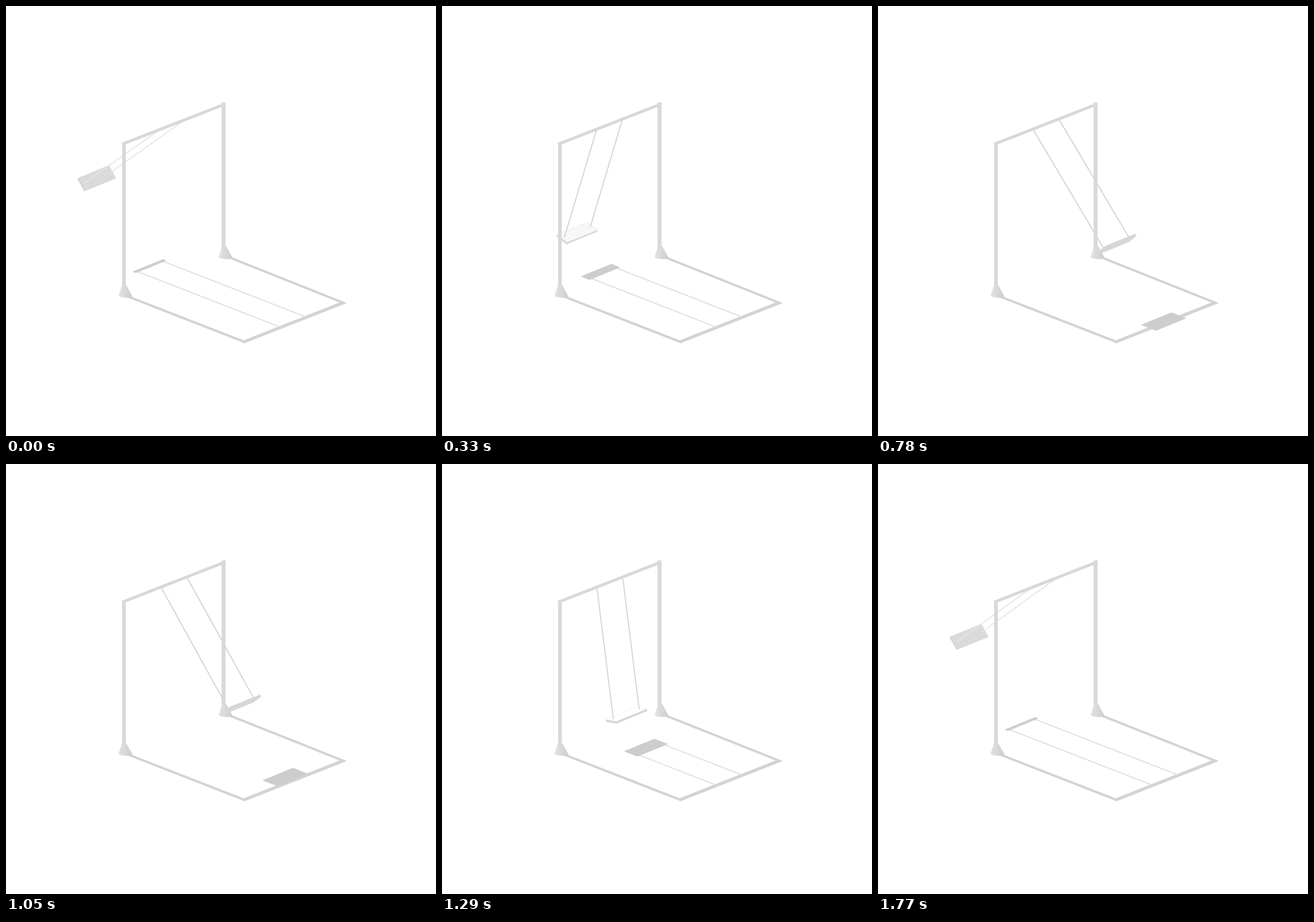
Recreate the animation shown at these times as an HTML page with a canvas. Size 700 px wide and 700 px high, loop 1.8 s.

```html
<!DOCTYPE html>
<html>
<head>
<meta charset="utf-8">
<style>
html, body { margin: 0; width: 100%; height: 100%; overflow: hidden; background: #fff; }
canvas { display: block; width: 700px; height: 700px; }
</style>
</head>
<body>
<canvas id="c" width="700" height="700"></canvas>
<script>
const ctx = document.getElementById('c').getContext('2d');
const LOOP = 1800, STEP = 30;
const REACH = 167, DROP = 210;        // rope length projected forward and down
const SLOPE = 0.39;                   // screen slope of the floor's forward axis
const HEIGHT = 247, CAST = 195;       // beam height and length of its shadow
const LEFT = [252, 200], RIGHT = [294, 183.5];
const END = [3.75, -1.8];             // seat overhang beyond each rope
const HALF = 0.051;                   // seat half width per rope length
const TOP = 0.99, BOTTOM = 1.006;     // seat faces, measured along the rope

const grey = v => `rgb(${v},${v},${v})`;
const add = (p, q, k = 1) => [p[0] + q[0] * k, p[1] + q[1] * k];

function path(points) {
  ctx.beginPath();
  points.forEach(p => ctx.lineTo(...p));
}
function fill(points, color) {
  path(points);
  ctx.closePath();
  ctx.fillStyle = color;
  ctx.fill();
}
function line(points, width, color) {
  path(points);
  ctx.lineWidth = width;
  ctx.strokeStyle = color;
  ctx.stroke();
}

// Screen offset of a point lying s forward and d below the beam
const place = ([s, d]) => [s, SLOPE * s + d];
// Where the same point's shadow lands on the floor
function shade([s, d]) {
  const f = s + (HEIGHT - d) / HEIGHT * CAST;
  return [f, HEIGHT + SLOPE * f];
}

function quad(back, front, project) {
  const l = add(LEFT, END, -1), r = add(RIGHT, END);
  const b = project(back), f = project(front);
  return [add(l, b), add(l, f), add(r, f), add(r, b)];
}

// Fills a slab given its two faces
function slab(a, b, color) {
  fill(a, color);
  fill(b, color);
  for (let i = 0; i < 4; i++) {
    const j = (i + 1) % 4;
    fill([a[i], a[j], b[j], b[i]], color);
  }
}

function foot(x, y) {
  const g = ctx.createLinearGradient(x - 9, 0, x + 13, 0);
  g.addColorStop(0, '#e3e3e3');
  g.addColorStop(1, '#cecece');
  ctx.beginPath();
  ctx.moveTo(x - 3, y - 17);
  ctx.lineTo(x + 3.5, y - 17);
  ctx.lineTo(x + 14, y + 2);
  ctx.quadraticCurveTo(x + 8, y + 5, x, y + 3.5);
  ctx.quadraticCurveTo(x - 6, y + 3, x - 9, y + 1);
  ctx.closePath();
  ctx.fillStyle = g;
  ctx.fill();
}

function drawFloor() {
  line([[200, 473.5], [387, 546.3]], 4, '#d3d3d3');
  line([[363, 409], [550, 483.5]], 4, '#d3d3d3');
  fill([[385, 545], [387, 549.5], [555, 483.5], [547, 481]], '#d3d3d3');
}

function drawFrame() {
  line([[189, 225], [357, 159.5]], 5, '#d8d8d8');
  line([[192, 223], [192, 462]], 6, '#d9d9d9');
  line([[354.2, 157], [354.2, 400]], 6.5, '#d9d9d9');
  foot(192, 471);
  foot(355, 408);
}

function drawSwing(angle) {
  const sin = Math.sin(angle), cos = Math.cos(angle), deg = angle * 180 / Math.PI;
  const hang = [REACH * sin, DROP * cos];
  const along = [REACH * cos, -DROP * sin];
  const face = (level, project) => {
    const mid = [hang[0] * level, hang[1] * level];
    return quad(add(mid, along, -HALF), add(mid, along, HALF), project);
  };

  for (const p of [LEFT, RIGHT])
    line([add(p, shade([0, 0])), add(p, shade(hang))], 1.5, '#dcdcdc');
  slab(face(TOP, shade), face(BOTTOM, shade), '#cdcdcd');

  const top = face(TOP, place);
  slab(top, face(BOTTOM, place), '#d6d6d6');
  const topVisible = deg < 32.9;
  if (topVisible) fill(top, grey(Math.min(255, 218 + (deg + 49) * 0.95)));

  const rope = grey(210 + Math.max(0, -deg - 20) * 0.7);
  for (const p of [LEFT, RIGHT]) line([p, add(p, place(hang), TOP)], 1.7, rope);
}

function draw(now) {
  const t = Math.floor(now % LOOP / STEP) * STEP;
  const phase = t / LOOP * 2 * Math.PI;
  const swing = (Math.cos(phase) + 0.02 * Math.cos(3 * phase)) / 1.02;
  ctx.fillStyle = '#fff';
  ctx.fillRect(0, 0, 700, 700);
  drawFloor();
  drawSwing(-48.9 * Math.PI / 180 * swing);
  drawFrame();
}

const start = performance.now();
function tick() {
  draw(performance.now() - start);
  requestAnimationFrame(tick);
}
tick();
</script>
</body>
</html>
```
